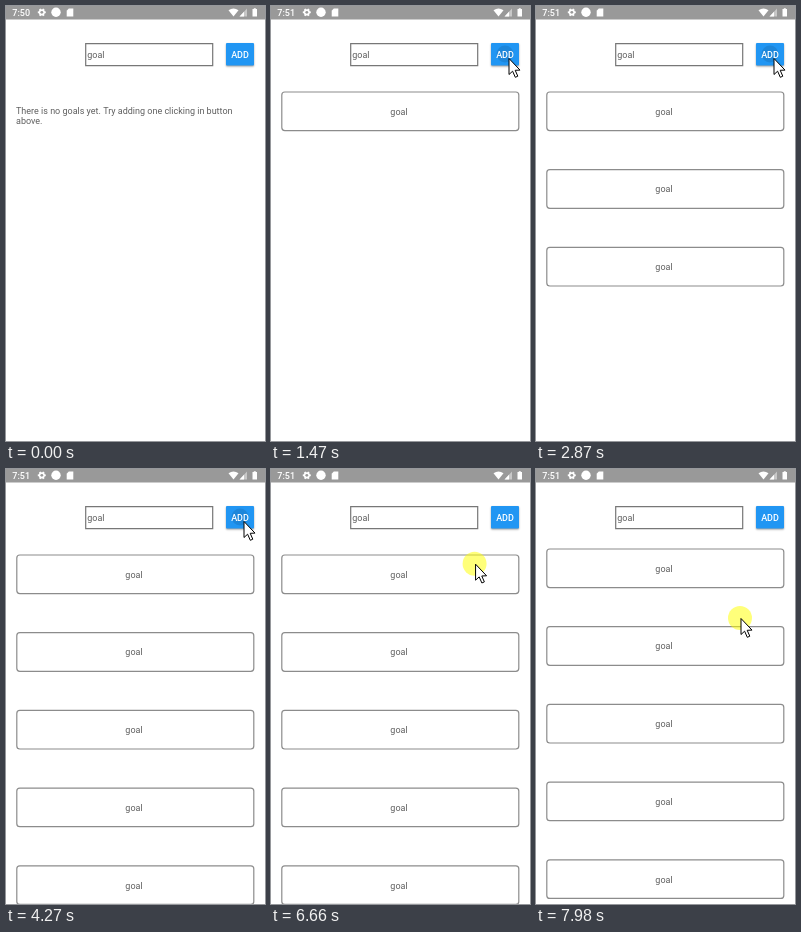
Animation, 259 px wide and 435 px high, one loop 8 s. Source, as an HTML page with a canvas:

```html
<!DOCTYPE html>
<html lang="en">
<head>
<meta charset="utf-8">
<title>Goal list</title>
<style>
  html, body { margin: 0; width: 100%; height: 100%; overflow: hidden; background: #fff; }
  canvas { display: block; width: 259px; height: 435px; }
</style>
</head>
<body>
<canvas id="stage" width="259" height="435"></canvas>
<script>
const ctx = document.getElementById('stage').getContext('2d');
const LOOP = 8000;
const BAR = '#999', INK = '#5f5f5f';

// The button is clicked at a steady beat; each click adds a goal a little later.
const BEAT = 700, FIRST_CLICK = 1000, CLICKS = 7, CLICK_LENGTH = 90;
const GOAL_DELAY = 470, GOALS = 5, RIPPLE_LENGTH = 150;
const CARD_TOP = 86, CARD_STEP = 77.7;
const DRAG_START = 6510, DRAG_END = 6970, TOUCH_LAG = 150;

const clamp = v => Math.max(0, Math.min(1, v));
const progress = (t, start, end) => clamp((t - start) / (end - start));
const ease = k => k * k * (3 - 2 * k);

// True during the first `length` ms of each beat after `start`.
function onBeat(t, start, count, length) {
  const since = t - start;
  return since >= 0 && since < count * BEAT && since % BEAT < length;
}

function pointerAt(t) {
  let x = 174, y = 86;
  const glide = (start, end, toX, toY) => {
    const k = ease(progress(t, start, end));
    x += (toX - x) * k;
    y += (toY - y) * k;
  };
  glide(70, 240, 172, 22);
  glide(390, 1010, 237.5, 52);
  glide(5680, 6200, 222, 211);
  glide(6200, 6400, 200, 106);
  glide(DRAG_START, 7000, 218, 56);
  glide(7180, 7520, 212, 152);
  glide(7670, 7830, 205, 134);
  glide(7830, 7980, 204.5, 149);
  return [x, y];
}

function mouseDown(t) {
  return onBeat(t, FIRST_CLICK, CLICKS, CLICK_LENGTH) ||
    (t >= DRAG_START && t < DRAG_END) || t >= 7830;
}

function text(str, x, y, color, { weight = 400, align = 'left' } = {}) {
  ctx.font = `${weight} 9px Roboto, sans-serif`;
  ctx.textAlign = align;
  ctx.fillStyle = color;
  ctx.fillText(str, x, y);
}

function shape(path, fill, stroke) {
  const outline = new Path2D(path);
  ctx.fillStyle = fill;
  ctx.fill(outline);
  if (stroke) {
    ctx.strokeStyle = stroke;
    ctx.lineWidth = 1;
    ctx.stroke(outline);
  }
}

function box(x, y, w, h, radius, color) {
  ctx.strokeStyle = color;
  ctx.lineWidth = 1.2;
  ctx.beginPath();
  ctx.roundRect(x, y, w, h, radius);
  ctx.stroke();
}

function disc(x, y, r, color) {
  ctx.beginPath();
  ctx.arc(x, y, r, 0, Math.PI * 2);
  ctx.fillStyle = color;
  ctx.fill();
}

function gear(x, y) {
  ctx.strokeStyle = '#fff';
  ctx.lineWidth = 1.8;
  for (let angle = 0; angle < Math.PI - .1; angle += Math.PI / 3) {
    const dx = 4 * Math.cos(angle), dy = 4 * Math.sin(angle);
    ctx.beginPath();
    ctx.moveTo(x - dx, y - dy);
    ctx.lineTo(x + dx, y + dy);
    ctx.stroke();
  }
  disc(x, y, 3.1, '#fff');
  disc(x, y, 1.4, BAR);
}

function statusBar(t) {
  ctx.fillStyle = BAR;
  ctx.fillRect(0, 0, 259, 13.5);
  text(t < 70 ? '7:50' : '7:51', 6.3, 9.8, '#fff', { weight: 500 });
  gear(35.8, 6.3);
  disc(50, 6.3, 4.7, '#fff');
  shape('M62.8 2.5H67.3V10.5H60.7V4.8Z', '#fff');              // memory card
  shape('M227.5 10.5L222.5 4.3Q227.5 .8 232.5 4.3Z', '#fff');  // wifi
  shape('M241 2.5V10.5H233.5Z', '#c8c8c8');                    // signal
  shape('M238 5.7V10.5H233.5Z', '#fff');
  shape('M246.5 3H247.8V2.2H249.8V3H251V10.5H246.5Z', '#fff'); // battery
}

function addButton(t) {
  ctx.save();
  ctx.shadowColor = 'rgba(0,0,0,.4)';
  ctx.shadowBlur = 2;
  ctx.shadowOffsetY = 1;
  ctx.fillStyle = t >= 5590 && t < 6300 ? '#1f81d2' : '#2196f3';
  ctx.beginPath();
  ctx.roundRect(220, 37, 28, 22.5, 1);
  ctx.fill();
  ctx.restore();
  if (onBeat(t, FIRST_CLICK + GOAL_DELAY, CLICKS - 1, RIPPLE_LENGTH)) {
    disc(234, 48, 8.5, 'rgba(0,0,0,.1)');
  }
  text('ADD', 234, 51.8, '#fff', { weight: 500, align: 'center' });
}

function goalCard(y, alpha) {
  ctx.globalAlpha = alpha;
  box(10.8, y, 237, 38.6, 3, '#8c8c8c');
  text('goal', 128, y + 22.7, INK, { align: 'center' });
  ctx.globalAlpha = 1;
}

function goalList(t) {
  const sinceFirst = t - FIRST_CLICK - GOAL_DELAY;
  if (sinceFirst < 0) {
    text('There is no goals yet. Try adding one clicking in button', 10, 108, INK);
    text('above.', 10, 118, INK);
  }
  const count = Math.min(GOALS, Math.floor(sinceFirst / BEAT) + 1);
  const top = CARD_TOP - (t >= DRAG_END ? 6 : 0);
  const touch = t < DRAG_END ? progress(t, DRAG_START + TOUCH_LAG, DRAG_START + 2 * TOUCH_LAG) : 0;
  for (let i = 0; i < count; i++) {
    goalCard(top + i * CARD_STEP, i === 0 ? 1 - touch / 2 : 1);
  }
  if (t >= 6890) {
    ctx.fillStyle = `rgba(0,0,0,${.35 * (1 - progress(t, 7670, 7970))})`;
    ctx.fillRect(257.5, 138, 1.5, 297);
  }
}

function pointer(t) {
  if (t < 70) return;
  const [x, y] = pointerAt(t);
  if (mouseDown(t)) disc(x - .5, y, 12, 'rgba(255,255,0,.52)');
  ctx.save();
  ctx.translate(x + .5, y + .5);
  shape('M0 0V16L3.6 12.7L6.3 18.8L8.8 17.7L6.2 11.8L11 11.6Z', '#fff', '#000');
  ctx.restore();
}

function draw() {
  const t = performance.now() % LOOP;
  ctx.fillStyle = '#fff';
  ctx.fillRect(0, 0, 259, 435);
  statusBar(t);
  box(79.7, 37.6, 127, 22, 0, '#777');
  text('goal', 81.2, 51.8, INK);
  addButton(t);
  goalList(t);
  pointer(t);
  requestAnimationFrame(draw);
}
draw();
</script>
</body>
</html>
```
